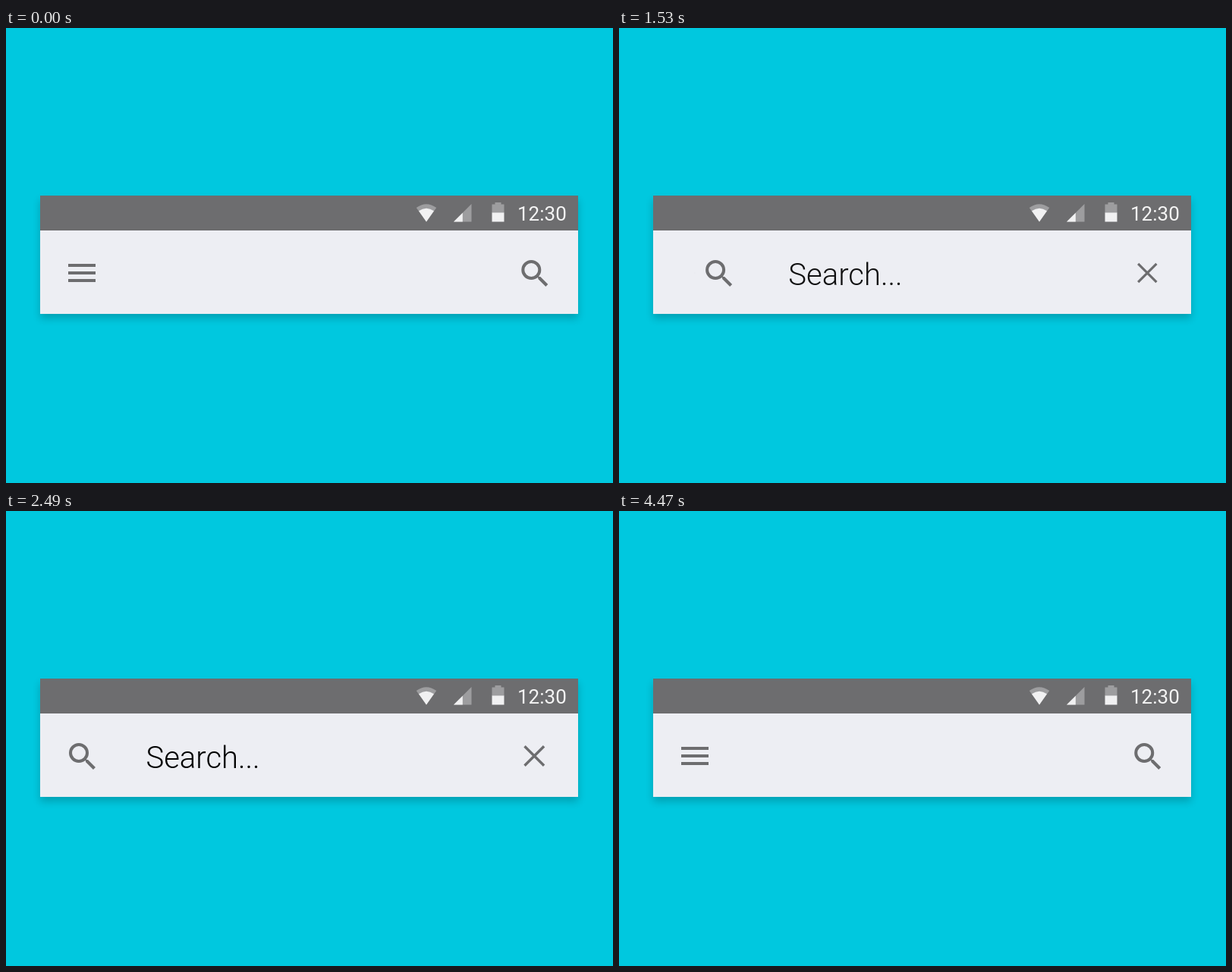
An HTML page for the animation above (4740 ms loop, 800 by 600 pixels).

```html
<!DOCTYPE html>
<html lang="en">
<head>
<meta charset="utf-8">
<title>Search bar</title>
<style>
  html, body { margin: 0; width: 100%; height: 100%; overflow: hidden; background: #00c8df; }
  svg { position: absolute; left: 0; top: 0; width: 800px; height: 600px; }
  .card {
    position: absolute; left: 45px; top: 221px; width: 709px; height: 156px;
    background: #edeef3; box-shadow: 0 6px 10px rgba(0, 0, 0, .2);
  }
  .clock { font: 400 26px Roboto, sans-serif; fill: #f4f4f4; }
  .label { font: 300 40px Roboto, sans-serif; fill: #000; }
  .ink { fill: #6d6d6f; }
  .dim { fill: #9d9d9f; }
  .lit { fill: #f1f1f2; }
</style>
</head>
<body>
<div class="card"></div>
<svg viewBox="0 0 800 600">
  <clipPath id="bar"><path d="M45 267H754V377H45z"/></clipPath>

  <path fill="#6d6d6f" d="M45 221H754V267H45z"/>
  <path class="dim" d="M554 255.5L540.8 237Q554 227.5 567.2 237z"/>
  <path class="lit" d="M554 255.5L544 241.3Q554 234.3 564 241.3z"/>
  <path class="dim" d="M613.5 232V255.5H590z"/>
  <path class="lit" d="M601.8 243.7V255.5H590z"/>
  <path class="dim" d="M640.5 232.5H644.5V230H652.5V232.5H656.5V244H640.5z"/>
  <path class="lit" d="M640.5 243.5H656.5V255.5H640.5z"/>
  <text class="clock" x="674" y="254">12:30</text>

  <g clip-path="url(#bar)">
    <g id="menu">
      <path class="ink" d="M-18 -12h36v4h-36zM-18 -2h36v4h-36zM-18 8h36v4h-36z"/>
    </g>
    <g id="close">
      <path d="M-12.8 -12.8L12.8 12.8M12.8 -12.8L-12.8 12.8" stroke="#6d6d6f" stroke-width="3.4"/>
    </g>
    <text id="label" class="label" y="339">Search...</text>
    <g id="lens">
      <circle cx="19" cy="19" r="11" fill="none" stroke="#6d6d6f" stroke-width="4"/>
      <path class="ink" d="M31 28h-1.6l-2.6 -2.6 -1.4 1.4 2.6 2.6v1.6l10 10 3 -3z"/>
    </g>
  </g>
</svg>
<script>
  const LOOP = 4740, TICK = 30, OPEN = 1260, SHUT = 3628;
  const DAMP = 10.74, FREQ = 7.33;
  const [menu, close, label, lens] =
    ['menu', 'close', 'label', 'lens'].map(id => document.getElementById(id));

  const clamp = v => Math.min(1, Math.max(0, v));

  // Damped spring from 0 to 1, ms since release
  function spring(ms) {
    const s = Math.max(0, ms) / 1000, a = FREQ * s;
    return 1 - Math.exp(-DAMP * s) * (Math.cos(a) + DAMP / FREQ * Math.sin(a));
  }

  function place(el, x, y, scale, alpha) {
    el.setAttribute('transform', `translate(${x} ${y}) scale(${Math.max(0, scale)})`);
    el.setAttribute('opacity', clamp(alpha));
  }

  function draw(t) {
    const open = t < SHUT ? spring(t - OPEN) : 1 - spring(t - SHUT);
    const fade = t < SHUT ? (t - OPEN - 80) / 205 : 1 - (t - SHUT) / 85;
    const away = 1 - open;
    place(lens, 77 + 596.3 * away, 300, 1, 1);
    place(label, 184.5 + 745 * away, 0, 1, fade);
    place(menu, 100, 323, away, away);
    place(close, 696.3, 323, open, open * 1.05);
  }

  const start = performance.now();
  function frame() {
    const t = (performance.now() - start + 0.5) % LOOP;
    draw(Math.floor(t / TICK) * TICK);
    requestAnimationFrame(frame);
  }
  frame();
</script>
</body>
</html>
```
